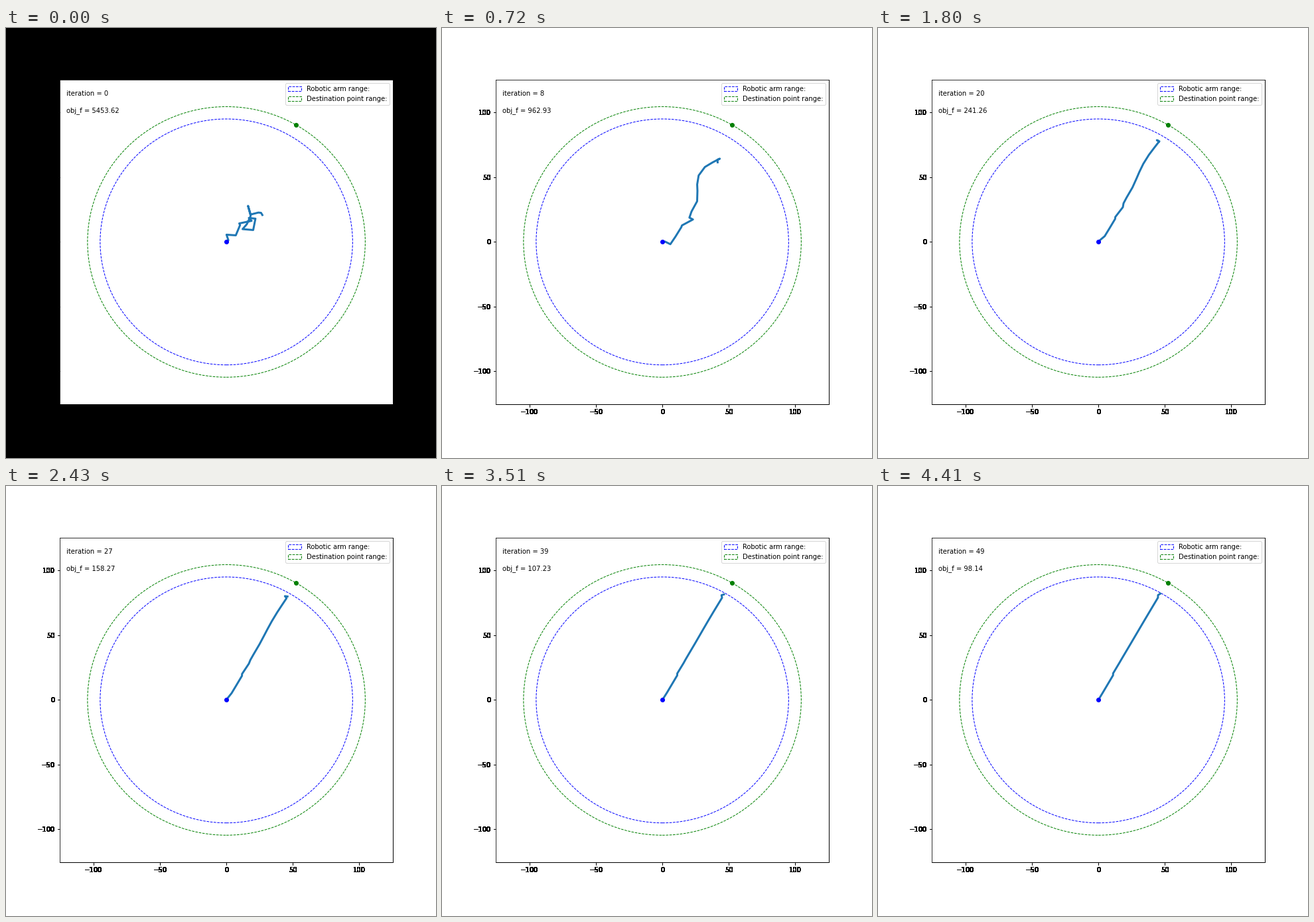
Animation of 648 by 648 pixels, one loop 4.5 s. Source, as a matplotlib script:

```python
import matplotlib.pyplot as plt
import numpy as np
from matplotlib.animation import FuncAnimation
from matplotlib.patches import Circle

FRAMES, INTERVAL = 50, 90
REACH = 95
GOAL_RADIUS = 1.1 * REACH
LIMIT = 1.2 * GOAL_RADIUS
HEADING = 60
GOAL = GOAL_RADIUS * np.exp(1j * np.radians(HEADING))
UNFOLDED = 8  # iteration at which the crumpled arm is fully opened

# Joints of the crumpled arm; link lengths and headings follow from them.
CRUMPLED = np.array([
    0, 1.5 + 1.3j, 0.1 + 5.6j, 7.1 + 5.1j, 10.3 + 13j, 9.7 + 14.3j,
    19 + 16.3j, 16.9 + 18.5j, 21.9 + 18j, 20.2 + 9.2j, 12.2 + 9.9j,
    15.4 + 13.7j, 18.3 + 20.1j, 16.3 + 27.9j, 18.3 + 21.2j, 24.1 + 22.7j,
    26.1 + 22.5j, 27.1 + 20.8j])
LINKS = np.diff(CRUMPLED)
LENGTHS = abs(LINKS) * REACH / abs(LINKS).sum()
MIDDLES = np.cumsum(LENGTHS) - LENGTHS / 2
START = np.degrees(np.angle(LINKS))


def bump(center, width):
    return np.exp(-((MIDDLES - center) / width) ** 2)


def open_angles(iteration):
    """Link headings of the opened arm: bends that fade, a hook, a folded tip."""
    wave = 33 * np.sin(2 * np.pi * (MIDDLES - 45) / 55)
    bends = wave - 120 * bump(4, 5) + 145 * bump(35.5, 2.5)
    angles = HEADING + bends * np.exp((UNFOLDED - iteration) / 8)
    angles += 30 * bump(22.75, 1)
    fold = 200 * np.exp(-iteration / 25)
    angles[-2:] = HEADING + fold, HEADING - fold
    return angles


def joints(iteration):
    progress = np.clip((iteration - 1) / (UNFOLDED - 1), 0, 1)
    turn = open_angles(max(iteration, UNFOLDED)) - START
    turn = (turn + 180) % 360 - 180
    links = LENGTHS * np.exp(1j * np.radians(START + progress * turn))
    return np.concatenate([[0], np.cumsum(links)])


def objective(iteration):
    steps = [1, UNFOLDED, 20, 27, 39, 49]
    values = [5453.62, 962.93, 241.26, 158.27, 107.23, 98.14]
    return np.exp(np.interp(iteration, steps, np.log(values)))


def harden(image, dpi):
    """Make every touched pixel fully opaque."""
    image = image.copy()
    image[..., 3] = image[..., 3] > 0
    return image, 0, 0


plt.rcParams["font.family"] = "DejaVu Sans"
fig = plt.figure(figsize=(9, 9), dpi=72)
ax = fig.add_axes([0.125, 0.125, 0.775, 0.755])
ticks = range(-100, 101, 50)
ax.set(xlim=(-LIMIT, LIMIT), ylim=(-LIMIT, LIMIT), xticks=ticks, yticks=ticks)
for part in (ax.xaxis, ax.yaxis, ax.spines["bottom"], ax.spines["right"]):
    part.set_agg_filter(harden)

for radius, color, label in [(REACH, "b", "Robotic arm range:"),
                             (GOAL_RADIUS, "g", "Destination point range:")]:
    ax.add_patch(Circle((0, 0), radius, fill=False, color=color,
                        linestyle="--", label=label))
ax.legend(loc="upper right")

arm, = ax.plot([], [], color="tab:blue", linewidth=3)
ax.plot(0, 0, "bo")
ax.plot(GOAL.real, GOAL.imag, "go")
iteration_text = ax.text(-0.96 * LIMIT, 0.9 * LIMIT, "")
objective_text = ax.text(-0.96 * LIMIT, 0.8 * LIMIT, "")


def update(iteration):
    points = joints(iteration)
    arm.set_data(points.real, points.imag)
    iteration_text.set_text(f"iteration = {iteration}")
    objective_text.set_text(f"obj_f = {objective(iteration):.2f}")
    fig.set_facecolor("black" if iteration == 0 else "white")
    return arm, iteration_text, objective_text


anim = FuncAnimation(fig, update, frames=FRAMES, interval=INTERVAL,
                     repeat=True, repeat_delay=0)
plt.show()
```
